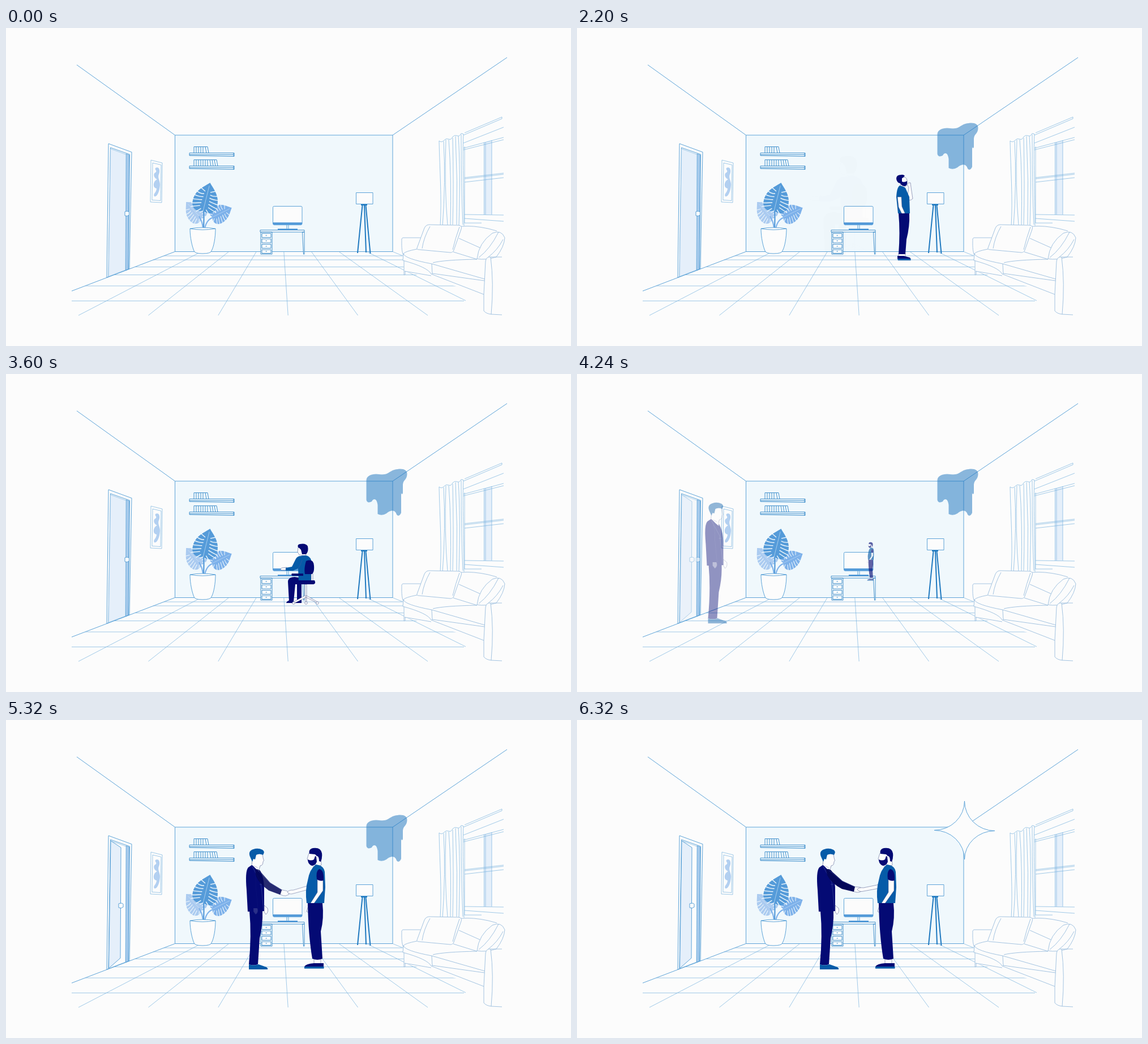
An HTML page that plays this animation: 998x561 px, repeating every 7 s.

```html
<!DOCTYPE html>
<html lang="en">
<head>
<meta charset="utf-8">
<title>Room visit</title>
<style>
html, body { margin: 0; width: 100%; height: 100%; overflow: hidden; background: #fcfcfc; }
svg { display: block; width: 998px; height: 561px; }
.line { fill: none; stroke: #4d9ad4; stroke-width: .9; }
.dark { fill: none; stroke: #2f86c8; stroke-width: .9; }
.thin { fill: none; stroke: #79b3de; stroke-width: .7; }
.pale { fill: #e5effa; }
.paper { fill: #fcfcfc; }
.navy { fill: #040a74; }
.blue { fill: #065ba8; }
.skin { fill: #fdfdfd; stroke: #4c568a; stroke-width: .55; }
.seam { fill: none; stroke: #4958a5; stroke-width: .5; }
</style>
</head>
<body>
<svg viewBox="0 0 998 561">
<defs>
  <g id="leaf">
    <path fill="currentColor" d="M0-2C-5 4-23 4-24-14C-25-36-9-46 0-56C9-46 25-36 24-14C23 4 5 4 0-2Z"/>
    <path fill="none" stroke="#f0f8fc" stroke-width="1.500" d="M-25-3Q-16-6-8-9M-26-10Q-16-12-7-15M-27-18Q-15-19-7-21M-25-27Q-14-25-6-27M-22-35Q-13-31-6-33M-15-43L-5-38M25-3Q16-6 8-9M26-10Q16-12 7-15M27-18Q15-19 7-21M25-27Q14-25 6-27M22-35Q13-31 6-33M15-43L5-38M-13 4L-5-4M13 4L5-4"/>
    <path fill="none" stroke="#f0f8fc" stroke-width=".5" d="M0 0V-50"/>
  </g>
</defs>

<!-- Room -->
<path class="line" style="fill:#f0f8fc" d="M298.500 189H683V394.500H298.500Z"/>
<path class="line" d="M125 65L298.500 189M885 52L683 189M298.500 394.500L116 464"/>
<g class="thin" id="floor"></g>

<!-- Door -->
<path class="line" d="M178 440L181 204L222 219L218 425Z"/>
<path class="line" d="M181 438.500L184.500 211L218.500 223L216.500 425.500"/>
<path d="M212 222L217.500 224L216 425.500L211.500 427Z" fill="#a8cbec" stroke="#4d9ad4" stroke-width=".7"/>
<g id="shut">
  <path class="thin" style="fill:#e5effa" d="M184.500 213L212 223L211 427L181 438.500Z"/>
  <path class="line" style="fill:#fcfcfc" d="M210 324Q216 322 217.500 325V330Q214 333 210 331Z"/>
</g>
<g id="open">
  <path class="thin" style="fill:#fcfcfc" d="M184.500 213L212 223L211 427L181 438.500Z"/>
  <path class="line" style="fill:#e5effa" d="M185 213L203 225L202 420L181.500 438Z"/>
  <path class="line" style="fill:#fcfcfc" d="M199 324Q206 322 207 325V330Q204 333 199 331Z"/>
</g>

<!-- Picture -->
<path class="thin" d="M256 233L276 238L275 308L255 307ZM259 238L274 241.500L273 304.500L258 303.500Z"/>
<path fill="#b3d0f1" d="M264 247C270 243 273 251 270 258C267 265 273 270 272 278C271 288 267 299 262 297C259 293 266 290 266 283C258 282 260 270 267 267C260 264 260 256 264 255C268 251 262 251 264 247Z"/>

<!-- Shelves -->
<g class="dark" id="shelves"></g>

<!-- Plant -->
<g style="color:#abcbf0"><use href="#leaf" transform="translate(346 337) rotate(-43) scale(.73)"/></g>
<g style="color:#7db1ea"><use href="#leaf" transform="translate(364 334) rotate(64) scale(.69)"/></g>
<path fill="none" stroke="#7db1ea" stroke-width="2" d="M351 354Q354 338 366 334M348 354Q347 341 341 332"/>
<path fill="none" stroke="#559bd9" stroke-width="2.200" d="M349 354Q350 338 349 320"/>
<g style="color:#559bd9"><use href="#leaf" transform="translate(348 323) rotate(14) scale(.92)"/></g>
<path class="line" style="fill:#fcfcfc" d="M325 354C325 370 329 386 332 393Q333 398 347 398Q362 398 363 393C367 386 370 370 370 354Q347 350 325 354Q347 358 370 354"/>

<!-- Desk and screen -->
<path class="dark" style="fill:#fcfcfc" d="M449 356.500H527V360H449ZM450 360H470V399H450ZM523.500 360H527V399H525.500Z"/>
<path class="dark" d="M452 362.500H468V369.500H452ZM452 372H468V379H452ZM452 381.500H468V388.500H452ZM452 391H468V397.500H452ZM458.500 366H461M458.500 375.500H461M458.500 385H461M458.500 394H461"/>
<rect class="line" style="fill:#fcfcfc" x="471.500" y="314.500" width="51.500" height="32.500" rx="2"/>
<path fill="#559bd9" d="M471.500 343H523V345.500Q523 347.500 521 347.500H473.500Q471.500 347.500 471.500 345.500ZM480 354H515V356.200H480Z"/>
<path class="line" d="M496 347.500V354M499 347.500V354"/>

<!-- Lamp -->
<path class="line" style="fill:#fcfcfc" d="M618.500 290.500H648V310.500H618.500Z"/>
<path fill="none" stroke="#1e78bf" stroke-width="2" d="M627 312H638M629.500 313L621 397M633 313L636 396M635.500 313L643.500 398"/>

<!-- Window and curtain -->
<path class="pale" d="M844.500 202L858 198V329H844.500Z"/>
<path class="thin" d="M844.500 202V329M858 198V329M847 202V329M810 185L876 157V160L808 189M808 203L879 175M808 212L879 193M808 215L879 197M810 264L879 256M810 266L879 258M810 272L879 264M810 329L879 330M810 336L879 341M810 344H840M810 209V344"/>
<path class="thin" style="fill:#fcfcfc" d="M765 199Q769 203 774 198Q777 194 782 196Q786 198 789 192Q792 188 797 190Q801 192 804 186L808 187C806 230 809 290 809 350H767C770 300 766 250 765 199Z"/>
<path class="thin" d="M773 200Q777 270 771 350M777 197Q774 280 780 348M782 197Q787 260 785 348M789 194Q791 280 789 347M794 191Q798 270 796 347M799 191Q803 250 800 348M804 188Q804 280 807 347"/>

<!-- Sofa -->
<g style="fill:#fcfcfc;stroke:#8db5da;stroke-width:.8">
  <path stroke="none" d="M699 370H731L741 347L803 348L867 357L881 372L866 404L856 505L844 500V470L703 429Z"/>
  <path d="M703 436V403C698 395 699 380 699 372Q700 369 704 370H732M703 436L705 435V429M804 350Q825 348 852 354L867 358"/>
  <path d="M726 388L739 353Q742 346 750 347L800 348Q806 349 804 355L791 392Q789 397 784 396L730 391Q725 391 726 388ZM735 389Q738 369 749 350M789 391Q794 370 801 351"/>
  <path d="M702 398Q705 394 726 390M702 398Q704 407 752 416L846 443M790 395L832 408Q775 409 754 414M702 398L701 410Q745 422 751 434L844 470M752 416L753 434M704 429L751 437M800 371L838 388M753 433L846 446"/>
  <path d="M832 407Q835 379 859 362Q875 355 881 370Q880 386 866 404Q846 410 832 407ZM835 405Q855 390 870 360M852 404Q868 392 878 373"/>
  <path d="M844 499V470L847 412Q848 403 856 404Q862 450 857 505Q848 504 844 499M856 404H876M857 505L876 506"/>
</g>

<path id="stain" fill="#1c74bf" fill-opacity=".51" d="M636.500 187C637 179 648 175 660 177C674 179 676 172 686 169C698 166 709 167 708.500 177C708 187 702 186 701 195V210Q699.500 214 698 210V245Q694 253 690 248Q688 241 682 241Q676 242 672 246Q664 251 656.500 247V231C655 219 649 219 646 225Q638 229 636.500 222Z"/>
<path id="star" class="line" style="fill:#fcfcfc" d="M684.500 143A53.500 52.500 0 0 0 738 195.500A53.500 50.500 0 0 0 684.500 246A53.500 51.500 0 0 0 631 194.500A53.500 51.500 0 0 0 684.500 143Z"/>

<!-- Man looking up at the wall -->
<g id="thinker">
  <path class="skin" d="M574 264Q582 261 583 269V277L577 281L571 278Z"/>
  <path class="navy" d="M564 266Q564 259 572 259Q577 258 579 261Q576 264 574 265L574 271Q578 273 583 270Q584 278 579 279Q573 279 571 274Q565 273 564 266Z"/>
  <path class="skin" d="M568 403V398H580V403ZM584 296L586 281L583 276Q585 272 589 273L590 281L593 301Q588 306 583 302Z"/>
  <path class="blue" d="M570 278Q576 279 580 282L587 298L588 327H567L564 298Q565 281 570 278Z"/>
  <path class="skin" d="M566 298H573L574 315L579 326Q578 331 574 328L568 316Z"/>
  <path class="navy" d="M568 327H587Q588 350 582 373L580 399H568Q571 360 568 327ZM566 407V402H577L588 405L589.500 407Z"/>
  <path class="blue" d="M566 407H589.500V410H567Z"/>
</g>

<!-- Man at the desk -->
<g id="sitter">
  <path class="skin" d="M516 306L515 314L518 319L529 321L533 309L527 303Z"/>
  <path class="navy" d="M516 306Q514 301 519 300Q530 298 533 304Q535 313 530 318H523L521 310L518 307Z"/>
  <path class="skin" d="M496 341L487 342Q483 345 487 346H496Z"/>
  <path class="navy" d="M514 368H522V402H514ZM500 402L498 366Q499 358 510 358L530 361V371H511L508 402ZM495 404Q496 400 502 399H508V404ZM508 403Q513 399 522 400V404H508Z"/>
  <path class="blue" d="M521 321Q535 317 539 328L540 370H517L516 343L507 347H494V342L505 340L512 326Q515 321 521 321Z"/>
  <path class="seam" d="M523 328Q520 339 515 344"/>
  <path class="skin" d="M539 352H542V368H539ZM528 371H531V391L550 402V404L530 394L510 404L508 402L528 391ZM529 391H531V403H529Z"/>
  <path class="navy" d="M530 330Q543 325 544 338Q545 351 540 353H528Q526 344 530 330ZM505 352H525V356H506Q503 355 505 352ZM506 364H545Q548 370 543 371H506Z"/>
  <g class="skin"><circle cx="508" cy="404" r="2.300"/><circle cx="530" cy="404" r="2.300"/><circle cx="550" cy="404" r="2.300"/></g>
</g>

<!-- Visitor in a suit -->
<g id="visitor">
  <path class="skin" d="M436 237L453 235L454 243L455.500 248L454 250Q454 257 449 257L447 264L434 257Z"/>
  <path class="blue" d="M431 241Q427 231 437 228Q445 225 453 229Q458 232 454 238Q447 235 442 238L440 246L437 245L435 250Z"/>
  <path class="skin" d="M456 327L462 332Q464 339 459 343L456 338Z"/>
  <path class="navy" d="M434 256Q444 258 449 266Q455 276 456 295V337L447 338H427L425 300Q422 267 428 260Z"/>
  <path class="paper" d="M434 255L447 262L448 268L443 264Z"/>
  <path class="seam" d="M434 257L450 286L455 335M448 290H453"/>
  <path class="navy" d="M430 337H453Q454 360 448 385L445 431Q437 434 429 431Q434 380 430 337Z"/>
  <path class="blue" d="M429 440V431Q437 434 446 431L460 436Q463 438 462 440Z"/>
  <g id="armDown">
    <path class="skin" d="M437 329L444 332Q447 339 441 343L437 338Z"/>
    <path class="navy" d="M428 260Q439 261 441 276L444 332H434Q425 310 424 282Q423 264 428 260Z"/>
    <path class="seam" d="M438 266Q442 274 441 292L445 332"/>
  </g>
</g>
<g id="armLeft">
  <path class="skin" d="M487 294L500 295Q505 297 504 301Q499 305 494 304L487 302Z"/>
  <path fill="#030758" d="M440 264Q446 261 451 268L469 284L491 294L489 303L468 298Q449 288 442 274Z"/>
  <path class="seam" d="M444 264L468 284L490 294"/>
</g>

<!-- Bearded resident -->
<g id="armRight">
  <path class="skin" d="M555 278L530 291L506 296Q497 295 495 299Q499 304 506 302L533 297L556 287Z"/>
</g>
<g id="resident">
  <path class="skin" d="M535 235L547 233L556 240L557 256L545 260L536 252L532 245Z"/>
  <path class="navy" d="M536 236Q534 228 542 226Q556 224 558 235Q559 243 556 250L553 249Q553 240 549 240L546 237ZM533 246Q539 249 544 246L546 240L548 241L549 250Q547 257 540 257Q533 254 533 246Z"/>
  <path class="skin" d="M544 420H556V432H544Z"/>
  <path class="blue" d="M547 255Q561 256 563 268L564 295L562 323H531Q528 300 533 283Q536 264 547 255Z"/>
  <path class="skin" d="M550 280H560V301L543 325L536 340L531 338L533 331L550 304Z"/>
  <path class="navy" d="M553 263Q562 264 561 283Q554 285 549 281Q547 267 553 263Z"/>
  <path class="navy" d="M533 323H559Q562 350 556 373L559 421Q550 425 541 421Q534 380 533 323ZM527 435Q530 430 544 429H561V435Z"/>
  <path class="blue" d="M527 435H561.500V438.500H527Z"/>
  <path id="farHand" class="skin" d="M533 326L528 330Q525 337 528 340L533 335Z"/>
</g>
</svg>
<script>
const $ = id => document.getElementById(id);

const draw = (id, d) => { $(id).innerHTML = `<path d="${d}"/>`; };

// Floor grid: [y, left, right] for the rows, even steps for the columns
let grid = [[402, 279, 700], [409, 260, 702], [421.500, 227, 705], [435.500, 190, 755], [455, 140, 844], [481.500, 116, 809]]
  .map(([y, a, b]) => `M${a} ${y}H${b}`).join('');
for (let i = 0; i < 6; i++) grid += `M${345 + i * 48.600} 394.500L${128 + i * 123.400} 507`;
draw('floor', grid + 'M637 394.500L812 481M683 394.500L701 402');

const shelf = (y, books) => {
  let d = `M324 ${y}H403V${y + 6}L324 ${y + 4.500}ZM324 ${y + 3}H402M402 ${y}V${y + 6}M332 ${y}V${y - 11}`;
  for (let i = 0; i < books; i++) {
    const x = 332 + i * 4, lean = i > books / 2 ? 2 : 0;
    d += `M${x} ${y - 11}H${x + 4}L${x + 4 + lean} ${y}`;
  }
  return d;
};
draw('shelves', shelf(220.500, 6) + shelf(243.500, 10));

const ramp = (t, a, b) => Math.min(1, Math.max(0, (t - a) / (b - a)));
const out = (x, n) => 1 - (1 - x) ** n;
const inOut = x => x < .5 ? 4 * x ** 3 : 1 - 4 * (1 - x) ** 3;
const fade = (id, v) => { $(id).style.opacity = v; };
const move = (id, v) => $(id).setAttribute('transform', v);

function render(now) {
  const t = now % 7000;
  const sit = ramp(t, 2200, 2840);
  const meet = ramp(t, 4000, 4560);
  const shake = out(ramp(t, 4880, 5600), 2);
  const shine = ramp(t, 5600, 6320);

  fade('stain', ramp(t, 40, 760) * (1 - shine));
  fade('star', shine);
  fade('thinker', ramp(t, 40, 800) * (1 - ramp(t, 2200, 2520)));

  const away = 1 - out(sit, 5);
  fade('sitter', out(sit, 3) * (1 - ramp(t, 4000, 4200)));
  move('sitter', `translate(${525 - 45 * away} 406) scale(${1 + .7 * away}) translate(-525 -406)`);

  const p = inOut(meet);
  fade('shut', 1 - meet);
  fade('open', meet);
  fade('visitor', meet);
  move('visitor', `translate(${-290 * (1 - p)} 0)`);
  fade('resident', out(meet, 1.800));
  move('resident', `translate(${506 + 40 * p} ${330 + 3 * p}) scale(${p}) translate(-546 -333)`);

  const drop = 45 * (1 - shake);
  fade('armDown', (1 - shake) * meet);
  fade('farHand', 1 - shake);
  fade('armLeft', shake);
  fade('armRight', shake);
  move('armLeft', `rotate(${drop} 443 266)`);
  move('armRight', `rotate(${-drop * .7} 556 280)`);
  requestAnimationFrame(render);
}
render(0);
</script>
</body>
</html>
```
